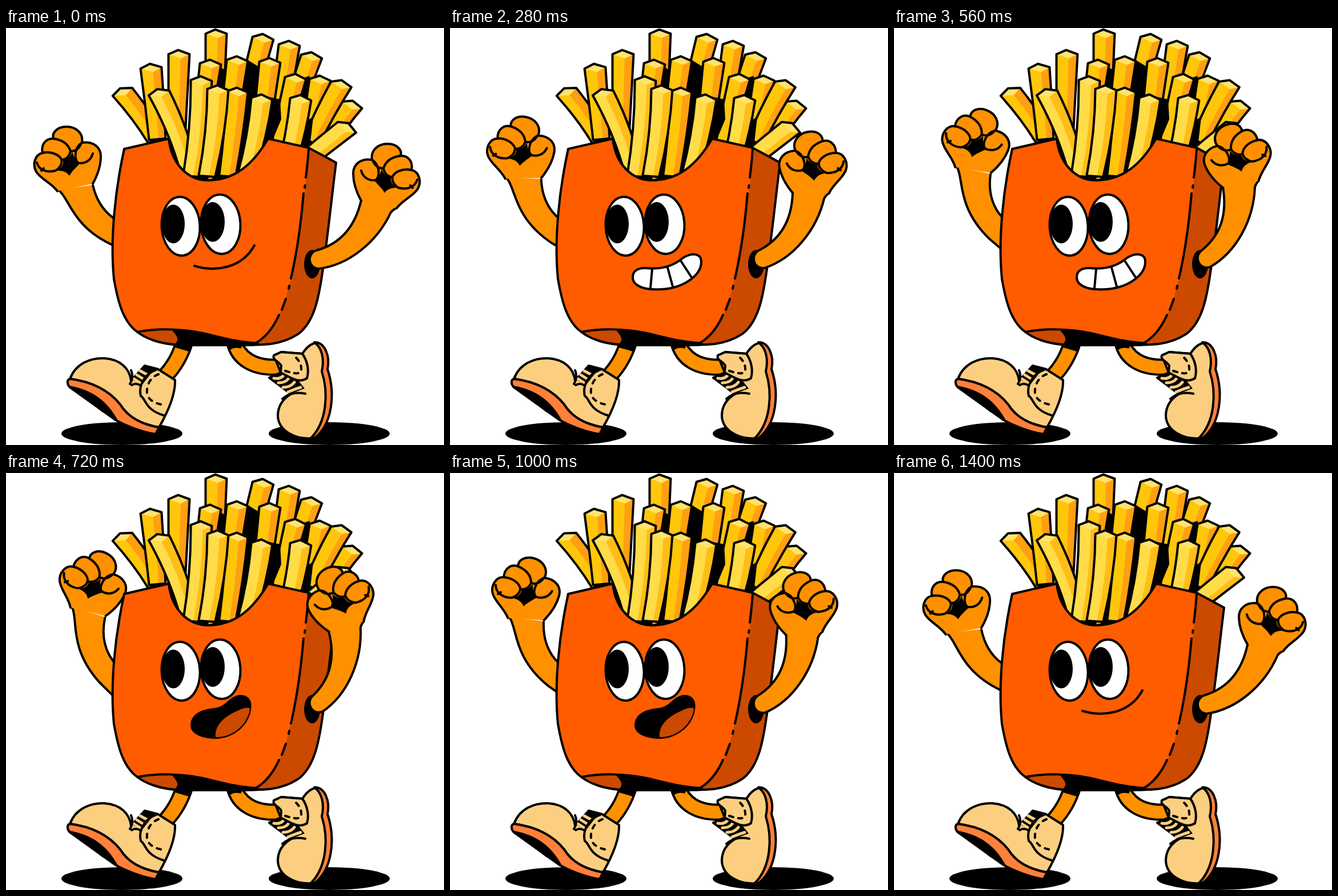
An HTML page for the animation above (1440 ms loop, 767 px wide and 731 px high).

```html
<!DOCTYPE html>
<html lang="en">
<head>
<meta charset="utf-8">
<title>Dancing fries</title>
<style>
html, body { margin: 0; width: 100%; height: 100%; overflow: hidden; background: #fff; }
svg { display: block; width: 767px; height: 731px; }
.line { fill: none; stroke: #000; stroke-width: 4; stroke-linecap: round; stroke-linejoin: round; }
.skin, .cream, .sole, .side, .white { stroke: #000; stroke-width: 4; stroke-linejoin: round; }
.skin { fill: #ff9100; }
.cream { fill: #fccf80; }
.sole { fill: #ff8038; }
.side { fill: #cc4a00; }
.white { fill: #fff; }
.lace { fill: none; stroke: #fccf80; stroke-width: 5; stroke-linecap: round; }
</style>
</head>
<body>
<svg viewBox="0 0 767 731">
  <defs>
    <g id="fist">
      <path class="skin" stroke-linecap="round" d="M-41 33C-51 15-55 0-55-15C-55-31-42-42-22-39C-25-55-12-67 5-67C22-67 31-56 28-46C42-47 50-35 47-21C61-18 65 0 58 12C50 25 32 31 21 46"/>
      <path d="M-20-4C-10-6-8-14-5-23C-2-13 4-9 11-8C10 0 14 7 24 10C13 10 6 11 0 19C-4 12-10 6-20-4Z"/>
      <path class="line" d="M-41-20C-38-8-28-2-16-3C-8-9-8-30-22-39M-20-36C-16-28-10-24-4-24M28-46C13-44 2-37-2-24C0-14 5-10 12-9M47-21C33-24 19-19 14-10C12-2 17 6 24 10C42 15 54 7 57-4M45 6L49 10"/>
    </g>
  </defs>

  <ellipse cx="203" cy="711" rx="106" ry="20"/>
  <ellipse cx="566" cy="711" rx="106" ry="20"/>

  <g id="legs">
    <path class="skin" d="M297 552C290 575 278 592 266 604L291 616C306 600 318 580 326 554Z"/>
    <path d="M296 552H330L320 567L296 560Z"/>
    <path class="skin" d="M387 552C395 590 430 612 482 607V581C445 584 425 574 414 554Z"/>
    <path d="M386 552H416L411 562Q400 558 390 566Z"/>
  </g>

  <g id="left-shoe">
    <path class="cream" d="M112 615C122 588 148 578 172 579C200 581 216 596 219 618L243 592L266 598L296 617C297 642 284 672 268 700C225 692 210 675 200 660C180 635 150 620 112 615Z"/>
    <path class="sole" d="M112 615C150 620 180 635 200 660C212 680 235 695 268 700L262 712C235 708 205 695 190 686L112 630C106 624 107 616 112 615Z"/>
    <path d="M111 627C150 634 176 652 196 688L168 673Z"/>
    <path d="M220 616L242 590L260 598L238 626Z"/>
    <path class="lace" d="M235 601L246 607M229 608L240 615M224 615L235 622"/>
    <path class="line" d="M219 600Q224 612 217 624M220 626Q228 621 236 627M263 599C241 607 232 628 236 645C245 650 243 669 276 679"/>
    <path class="line" stroke-dasharray="7 10" d="M267 607C250 613 244 632 248 645C254 655 262 658 277 661"/>
  </g>

  <g id="right-shoe">
    <path class="cream" d="M461 613L481 604L469 574L482 568L519 571C526 560 535 553 543 552C558 560 560 580 554 600C570 640 565 690 537 719C505 722 477 705 476 680C476 660 488 648 500 641Z"/>
    <path class="sole" d="M540 551C558 550 568 575 563 598C577 640 572 695 540 719L534 719C562 690 565 640 553 602C558 580 553 560 540 551Z"/>
    <path d="M459 614L483 603L512 618L523 632L496 642Z"/>
    <path class="lace" d="M469 614Q480 616 486 609M477 622Q490 622 495 614M485 630Q498 630 505 621M494 638Q508 632 516 630"/>
    <path class="cream" d="M469 574C466 582 478 584 482 592L481 604C497 612 512 624 527 614C531 600 528 584 519 571L482 568Z"/>
    <path class="line" d="M484 650Q500 636 524 641"/>
    <path class="line" stroke-dasharray="7 9" d="M489 601C505 606 514 608 517 600Q518 588 508 578"/>
  </g>

  <g id="back-fries"></g>
  <path d="M366 62L387 76L384 110L355 100ZM420 54L446 70L440 118L410 110ZM505 92L532 84L528 125L490 130Z"/>
  <g id="middle-fries"></g>
  <path d="M285 196L318 190L340 100L428 114L480 125L482 160L467 196L400 275H310ZM521 165L538 156L532 209L505 204Z"/>
  <g id="front-fries"></g>

  <g id="left-arm">
    <path class="skin" d="M92 284C111 298 116 350 190 382L235 398L225 355L188 333C170 320 158 302 152 275"/>
    <use href="#fist" transform="translate(111 240) scale(-1 1)"/>
  </g>

  <g id="box">
    <path class="side" d="M530 210L578 236C570 300 564 360 556 415C548 475 540 512 515 534C485 556 455 556 400 556H318C280 556 250 548 230 533L440 480Z"/>
    <path d="M290 529L345 532L445 553L400 557H318L296 554C304 546 300 540 290 529Z"/>
    <path class="line" style="fill:#ff5c00" d="M207 212L285 194C290 240 320 267 353 267C400 267 432 240 459 194L530 210C524 300 512 385 497 446C486 495 466 540 438 552C410 552 375 542 345 535C310 527 262 526 230 533C205 515 196 480 189 440C182 370 191 285 207 212Z" stroke-dasharray="none" stroke="none" id="face"/>
    <path class="line" d="M530 212Q528 240 525 262M523.5 276L523 280M521 290C516 350 508 400 499 439M496 452L495 457M490 475L483 494M478 503Q463 537 438 552"/>
  </g>

  <g id="eyes">
    <ellipse class="white" cx="306" cy="347.500" rx="33.500" ry="51.500" transform="rotate(-3 306 347)"/>
    <ellipse cx="293" cy="343.500" rx="20" ry="34"/>
    <ellipse class="white" cx="376" cy="344" rx="34.500" ry="52" transform="rotate(-3 376 344)"/>
    <ellipse cx="362" cy="340" rx="21" ry="35"/>
  </g>

  <path class="mouth line" d="M330 417C365 428 413 422 435 381"/>
  <g class="mouth">
    <path class="white" d="M320 437C320 425 330 420 345 421C375 424 395 414 408 403C424 393 440 395 440 410C440 433 410 456 370 458C340 460 320 452 320 437Z"/>
    <path class="line" d="M354 423L351 456M381 420L390 453M404 408L423 437"/>
  </g>
  <g class="mouth">
    <path d="M323 441C325 420 345 414 365 412C385 410 390 392 409 389C425 388 432 400 429 415C425 445 395 467 365 466C340 465 322 456 323 441Z"/>
    <path d="M367 463C365 440 385 426 405 417C418 411 427 410 427 414C423 441 397 464 367 463Z" fill="#cc4a00"/>
  </g>

  <ellipse cx="536" cy="414" rx="14" ry="25"/>
  <g id="right-arm">
    <path class="skin" d="M622 302C612 345 588 378 543 390C527 396 528 420 547 422C600 416 650 375 674 323C678 318 682 317 684 315"/>
    <use href="#fist" transform="translate(663 270)"/>
  </g>
</svg>

<script>
const LOOP = 1440, STEP = 40, PEAK = 700;
const FRY_WIDTH = 37, TAPER = .78;
const $ = id => document.getElementById(id);

// The front face hides its seam edge, which is drawn as a broken line instead.
const face = $('face'), outline = face.cloneNode();
outline.removeAttribute('id');
outline.style.fill = 'none';
outline.setAttribute('d', face.getAttribute('d')
  .replace(/C524 300.*438 552C/, 'M438 552C').replace('Z', ''));
face.style.stroke = 'none';
face.after(outline);

// One fry from the middle of its tip down to the height `foot`, leaning by `lean` per pixel.
function fry([x, y, lean], foot, bow, [left, right]) {
  const drop = foot - y, bend = bow + 8 * lean;
  const tilt = -.6 * Math.atan(lean);
  const c = Math.cos(tilt) * FRY_WIDTH, s = Math.sin(tilt) * FRY_WIDTH;
  const tip = (along, up) => [x + c * along + s * up, y + s * along - c * up];
  const a = tip(-.5, 0), b = tip(.5, 0), apex = tip(-.04, .2), ridge = tip(.08, -.2);
  const end = p => [a[0] + (p[0] - a[0]) * TAPER + lean * drop, p[1] + drop];
  const edge = (p, q) => `Q${(p[0] + q[0]) / 2 + bend} ${(p[1] + q[1]) / 2} ${q}`;
  const strip = (p, q) => `L${q}${edge(q, end(q))}L${end(p)}${edge(end(p), p)}Z`;
  const shape = `M${a}L${apex}${strip(a, b)}`;
  return `<path d="${shape}" fill="${left}"/>
    <path d="M${ridge}${strip(ridge, b)}" fill="${right}"/>
    <path d="M${a}L${apex}L${b}L${ridge}Z" fill="#ffe36c"/>
    <path class="line" d="${shape}"/>`;
}
const bunch = (id, tones, foot, bow, tips) =>
  $(id).innerHTML += tips.map(tip => fry(tip, foot, bow, tones)).join('');

const deep = ['#ffc60a', '#ff9f12'], pale = ['#ffdc48', '#ffbd18'];
bunch('back-fries', deep, 195, 0, [
  [368, 10, 0], [450, 18, -.23], [535, 50, -.3], [496, 30, -.12],
  [204, 112, .75], [254, 70, .12], [303, 46, 0]
]);
bunch('middle-fries', deep, 200, 0, [
  [358, 63, -.1], [405, 57, -.1], [462, 60, -.09], [550, 91, -.14],
  [507, 88, -.2], [606, 135, -.6], [587, 99, -.48]
]);
bunch('front-fries', deep, 260, 4, [[405, 112, -.09]]);
bunch('front-fries', pale, 260, 8, [
  [597, 174, -1.2], [516, 125, -.19], [268, 114, .4],
  [342, 92, -.08], [371, 108, -.1], [448, 124, -.18]
]);

const mouths = document.querySelectorAll('.mouth');
const mouthAt = t => t < 120 || t >= 1320 ? 0 : t < 680 ? 1 : 2;

function draw(now) {
  const t = Math.floor(now % LOOP / STEP) * STEP;
  const swing = t < PEAK ? t / PEAK : (LOOP - t) / (LOOP - PEAK);
  $('left-arm').setAttribute('transform', `rotate(${26 * swing} 213 312)`);
  $('right-arm').setAttribute('transform', `rotate(${-28.5 * swing} 543 405)`);
  mouths.forEach((m, i) => m.style.display = i === mouthAt(t) ? '' : 'none');
}

const start = performance.now();
function tick() {
  draw(performance.now() - start);
  requestAnimationFrame(tick);
}
tick();
</script>
</body>
</html>
```
